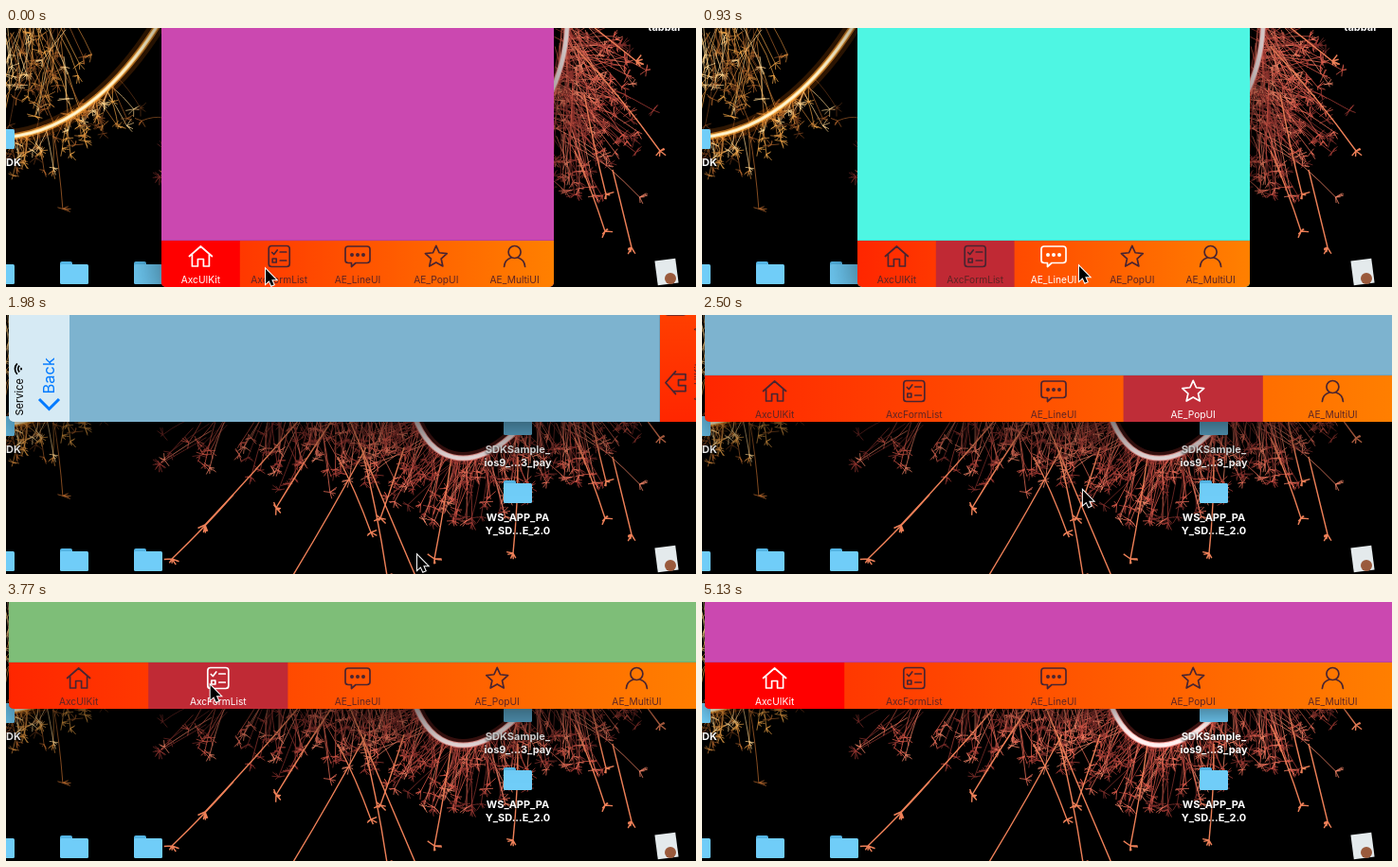
An HTML page with a canvas that plays this animation: 728x274 px, repeating every 5230 ms.

```html
<!DOCTYPE html>
<html lang="en">
<head>
<meta charset="utf-8">
<title>Tab bar demo</title>
<style>
  html, body { margin: 0; width: 100%; height: 100%; overflow: hidden; background: #000; }
  canvas { display: block; width: 728px; height: 274px; }
</style>
</head>
<body>
<canvas id="stage" width="728" height="274"></canvas>
<script>
const W = 728, H = 274, LOOP = 5230, FADE = 220;
const ROTATE_AT = 1980, ROTATE_END = 2320, BLUR_AT = 5130;
const CENTER = { x: 371, y: -94 };
const SHORT = 414, LONG = 736, BAR = 49;
const FONT = 'Inter, "Liberation Sans", sans-serif';

const ctx = document.getElementById('stage').getContext('2d');
const clamp = v => Math.max(0, Math.min(1, v));
const mix = (a, b, p) => a + (b - a) * p;

// Icons are drawn around their own centre.
const dot = (x, r) => `M${x - r} -1.5a${r} ${r} 0 1 0 ${2 * r} 0a${r} ${r} 0 1 0 ${-2 * r} 0`;
const starPoints = Array.from({ length: 10 }, (_, i) => {
  const r = i % 2 ? 5.6 : 12, a = -Math.PI / 2 + i * Math.PI / 5;
  return `${r * Math.cos(a)} ${r * Math.sin(a) + 0.8}`;
});
const TABS = [
  { label: 'AxcUIKit', page: '#cb48b0', fill: '#ff0000',
    icon: 'M-12 0L0 -10.5L12 0M-9 -2.5V10.5H-3V3H3V10.5H9V-2.5' },
  { label: 'AxcFormList', page: '#7ebe78', fill: '#c02a35',
    icon: 'M-8 -11H8Q11 -11 11 -8V8Q11 11 8 11H-8Q-11 11 -11 8V-8Q-11 -11 -8 -11Z' +
          'M-7.5 -4L-5.5 -2L-2 -6.5M1 -4.5H7.5M-7 2.5H-3V6.5H-7ZM1 4.5H7.5' },
  { label: 'AE_LineUI', page: '#4ef6e3', fill: '#c66c78',
    icon: 'M-10 -10.5H10Q13 -10.5 13 -7.5V4Q13 7 10 7H-2L-6.5 11V7H-10Q-13 7 -13 4V-7.5Q-13 -10.5 -10 -10.5Z',
    dots: [-6, 0, 6].map(x => dot(x, 2)).join('') },
  { label: 'AE_PopUI', page: '#7db3cf', fill: '#bf2d38',
    icon: `M${starPoints.join('L')}Z` },
  { label: 'AE_MultiUI', page: '#cb48b0', fill: '#c02a35',
    icon: 'M-6.5 -4.5a6.5 6.5 0 1 0 13 0a6.5 6.5 0 1 0 -13 0M-11 11C-10.5 5 -7 2.5 -3.5 1.5M11 11C10.5 5 7 2.5 3.5 1.5' }
].map(tab => ({ ...tab, icon: new Path2D(tab.icon), dots: tab.dots && new Path2D(tab.dots) }));

const CLICKS = [[0, 0], [350, 1], [930, 2], [1390, 3], [2970, 2], [3540, 1], [4070, 0]];

// time, x, y of the pointer tip
const POINTER = [
  [0, 274, 255], [169, 274, 255], [170, 275, 254], [460, 275, 254], [630, 398, 252],
  [1000, 398, 252], [1150, 455, 254], [1500, 455, 254], [1680, 434, 254], [2499, 434, 254],
  [2500, 402, 186], [2730, 375, 69], [3429, 375, 69], [3430, 228, 88], [3760, 228, 88],
  [3890, 82, 88], [4120, 82, 88], [4240, 557, 164], [4590, 600, 282], [LOOP, 600, 282]
];
const ARROW = new Path2D('M0 0V15.5L3.6 12.2L6 17.6L8.6 16.5L6.2 11.2H11Z');

function text(c, string, x, y, font, color, align = 'center') {
  c.font = `${font} ${FONT}`;
  c.fillStyle = color;
  c.textAlign = align;
  c.fillText(string, x, y);
}

// ---- Desktop, painted once ----

let seed = 7;
function random(a = 0, b = 1) {
  seed = (seed * 1664525 + 1013904223) % 4294967296;
  return a + (b - a) * seed / 4294967296;
}
const pick = list => list[Math.floor(random(0, list.length))];

function curvePoint(p, t) {
  const u = 1 - t;
  const at = i => u * u * u * p[i] + 3 * u * u * t * p[i + 2] + 3 * u * t * t * p[i + 4] + t * t * t * p[i + 6];
  return [at(0), at(1)];
}

function spark(c, x, y, angle, length, color, width = 0.8) {
  const ex = x + Math.cos(angle) * length, ey = y + Math.sin(angle) * length;
  c.strokeStyle = color;
  c.lineWidth = width;
  c.beginPath();
  c.moveTo(x, y);
  c.quadraticCurveTo((x + ex) / 2 + random(-2, 4), (y + ey) / 2 - random(0, 4), ex, ey);
  for (let i = 0; i < 6; i++) {
    const a = angle + random(-2.2, 2.2), r = random(3, 9);
    c.moveTo(ex, ey);
    c.lineTo(ex + Math.cos(a) * r, ey + Math.sin(a) * r);
  }
  c.stroke();
}

function glowCurve(c, p, layers) {
  for (const [color, width] of layers) {
    c.strokeStyle = color;
    c.lineWidth = width;
    c.beginPath();
    c.moveTo(p[0], p[1]);
    c.bezierCurveTo(...p.slice(2));
    c.stroke();
  }
}

function folder(c, x, y) {
  c.fillStyle = '#54b5e4';
  c.beginPath();
  c.roundRect(x - 15, y - 12, 13, 8, 2);
  c.fill();
  c.fillStyle = '#70cdf8';
  c.beginPath();
  c.roundRect(x - 15, y - 9, 30, 21, 1.5);
  c.fill();
}

function paintDesktop() {
  const canvas = document.createElement('canvas');
  canvas.width = W;
  canvas.height = H;
  const c = canvas.getContext('2d');
  c.fillRect(0, 0, W, H);

  const gold = ['#f0a548', '#a8602a', '#ffd690', '#6e3c1a', '#c98238'];
  const red = ['#d85a4a', '#f08468', '#a03a34', '#e86e58', '#7c2e2a'];
  const trail = [160, -3, 130, 45, 75, 112, -5, 116];
  const loop = [592, -5, 590, 110, 470, 215, 430, 105];

  for (let i = 0; i < 75; i++)
    spark(c, random(-10, 65), random(-30, 50), random(1, 2.3), random(25, 85), pick(gold), 0.7);
  for (let i = 0; i < 65; i++)
    spark(c, ...curvePoint(trail, random(0.35, 1)), random(0.6, 2.4), random(8, 50), pick(gold), 0.7);
  spark(c, 50, 110, 1.45, 82, gold[1]);
  spark(c, 165, 95, 3, 22, gold[1]);
  glowCurve(c, trail, [['#ff7a1430', 16], ['#ff9c30a0', 7], ['#ffd584', 4], ['#fff6d8', 2]]);

  for (let i = 0; i < 190; i++) {
    const [x, y] = curvePoint(loop, random());
    spark(c, x, y, Math.atan2(y - 30, x - 510) + random(-0.7, 0.7), random(12, 75), pick(red));
  }
  for (let i = 0; i < 110; i++)
    spark(c, random(270, 420), random(85, 120), random(1, 2.2), random(15, 75), pick(red));
  for (let i = 0; i < 120; i++)
    spark(c, random(578, 605), random(-20, 120), random(0.45, 1.7), random(25, 95), pick(red));
  for (let i = 0; i < 14; i++)
    spark(c, random(195, 260), random(100, 130), random(1.7, 2.7), random(20, 60), pick(red));

  const streaks = [
    [310, 110, 210, 222], [240, 190, 175, 258], [345, 110, 285, 204], [380, 140, 300, 280],
    [362, 110, 432, 276], [375, 140, 402, 276], [350, 150, 385, 230], [470, 150, 452, 258],
    [540, 150, 535, 252], [600, 20, 690, 130], [610, 70, 633, 176], [640, 150, 660, 232],
    [615, -5, 665, 35], [600, 130, 632, 215], [420, 140, 395, 215]
  ];
  for (const [x, y, ex, ey] of streaks)
    spark(c, x, y, Math.atan2(ey - y, ex - x), Math.hypot(ex - x, ey - y), '#ee8058', 1.4);
  glowCurve(c, loop, [['#ff504840', 13], ['#f49a94', 6], ['#fff0f0', 4]]);

  for (const [x, y] of [[-6, 259], [72, 259], [150, 259], [-6, 116], [540, 115], [540, 187]])
    folder(c, x, y);

  c.shadowColor = '#000';
  c.shadowBlur = 3;
  c.shadowOffsetY = 1;
  for (const [string, x, y] of [
    ['DK', 8, 146], ['tabbar', 695, 3], ['SDKSample_', 540, 146], ['ios9_...3_pay', 540, 160],
    ['WS_APP_PA', 540, 218], ['Y_SD...E_2.0', 540, 232]
  ]) text(c, string, x, y, 'bold 11px', '#fff');
  c.shadowColor = 'transparent';

  c.save();
  c.translate(697, 258);
  c.rotate(-0.13);
  c.fillStyle = '#e4eaec';
  c.fillRect(-11, -13, 22, 26);
  c.restore();
  c.fillStyle = '#9a5a3c';
  c.beginPath();
  c.arc(701, 265, 6, 0, 7);
  c.fill();
  return canvas;
}
const desktop = paintDesktop();

// ---- Phone ----

function drawNavigation(w) {
  ctx.fillStyle = '#d6eaf4';
  ctx.fillRect(0, 0, w, 64);
  text(ctx, 'Service', 6.5, 15, '11px', '#000', 'left');
  ctx.lineCap = 'butt';
  ctx.strokeStyle = '#000';
  ctx.lineWidth = 1.8;
  for (const r of [1.5, 4.7, 8]) {
    ctx.beginPath();
    ctx.arc(56, 14.5, r, -Math.PI * 0.75, -Math.PI * 0.25);
    ctx.stroke();
  }
  ctx.strokeStyle = '#007aff';
  ctx.lineWidth = 3;
  ctx.beginPath();
  ctx.moveTo(24, 32);
  ctx.lineTo(13.5, 42.5);
  ctx.lineTo(24, 53);
  ctx.stroke();
  text(ctx, 'Back', 29.5, 48, '16.5px', '#007aff', 'left');
}

function drawTabs(w, top, selected, previous, progress) {
  const gradient = ctx.createLinearGradient(0, 0, w, 0);
  gradient.addColorStop(0, '#ff2600');
  gradient.addColorStop(1, '#ff8000');
  ctx.fillStyle = gradient;
  ctx.fillRect(0, top, w, BAR);
  ctx.fillStyle = '#0003';
  ctx.fillRect(0, top - 0.5, w, 0.5);

  const cell = w / TABS.length;
  TABS.forEach((tab, i) => {
    ctx.globalAlpha = i === selected ? progress : i === previous ? 1 - progress : 0;
    ctx.fillStyle = tab.fill;
    ctx.fillRect(i * cell, top, cell, BAR);
    ctx.globalAlpha = 1;

    const x = (i + 0.5) * cell, on = i === selected;
    ctx.save();
    ctx.translate(x, top + 16.5);
    ctx.strokeStyle = ctx.fillStyle = on ? '#fff' : '#4a2430';
    ctx.lineWidth = 1.7;
    ctx.lineJoin = ctx.lineCap = 'round';
    ctx.stroke(tab.icon);
    if (tab.dots) ctx.fill(tab.dots);
    ctx.restore();
    text(ctx, tab.label, x, top + 44.5, '10.2px', on ? '#fff' : '#5c2424');
  });
}

function drawPhone(t) {
  const landscape = t >= ROTATE_AT, active = t < BLUR_AT;
  const ww = landscape ? LONG : SHORT, wh = landscape ? SHORT : LONG;
  const frame = new Path2D();
  frame.roundRect(CENTER.x - ww / 2, CENTER.y - wh / 2, ww, wh, 5);

  ctx.save();
  ctx.shadowColor = active ? 'rgba(0,0,0,.62)' : 'rgba(0,0,0,.4)';
  ctx.shadowBlur = active ? 50 : 22;
  ctx.shadowOffsetY = active ? 18 : 8;
  ctx.fillStyle = '#000';
  ctx.fill(frame);
  ctx.restore();

  const linear = clamp((t - ROTATE_AT) / (ROTATE_END - ROTATE_AT));
  const turn = linear * linear * (3 - 2 * linear);
  const w = mix(SHORT, LONG, turn), h = mix(LONG, SHORT, turn);
  const index = CLICKS.findLastIndex(([time]) => t >= time);
  const [time, selected] = CLICKS[index];
  const previous = index ? CLICKS[index - 1][1] : -1;
  const progress = index ? clamp((t - time) / FADE) : 1;

  ctx.save();
  ctx.clip(frame);
  ctx.translate(CENTER.x, CENTER.y);
  if (landscape) ctx.rotate(-Math.PI / 2 * (1 - turn));
  ctx.translate(-w / 2, -h / 2);
  ctx.fillStyle = TABS[selected].page;
  ctx.fillRect(0, 0, w, h);
  drawNavigation(w);
  drawTabs(w, h - BAR, selected, previous, progress);
  ctx.restore();
}

function drawPointer(t) {
  const next = POINTER.findIndex(([time]) => time > t);
  const [t0, x0, y0] = POINTER[next - 1], [t1, x1, y1] = POINTER[next];
  const p = (t - t0) / (t1 - t0);
  ctx.save();
  ctx.translate(mix(x0, x1, p), mix(y0, y1, p));
  ctx.lineWidth = 2;
  ctx.strokeStyle = '#fff';
  ctx.stroke(ARROW);
  ctx.fillStyle = '#000';
  ctx.fill(ARROW);
  ctx.restore();
}

const start = performance.now();
function render() {
  const t = (performance.now() - start) % LOOP;
  ctx.drawImage(desktop, 0, 0);
  drawPhone(t);
  drawPointer(t);
  requestAnimationFrame(render);
}
render();
</script>
</body>
</html>
```
